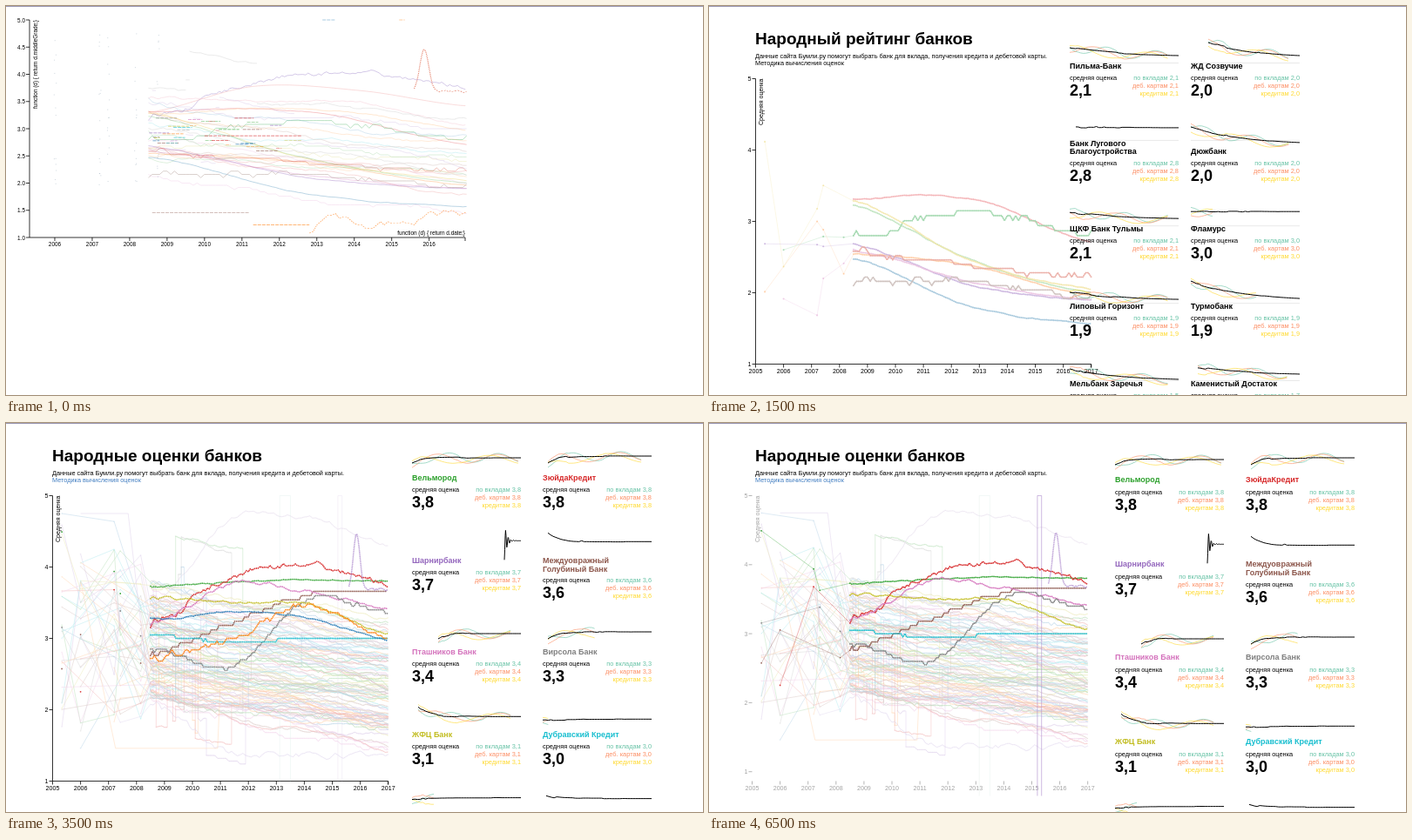
Write an HTML page that moves like this. It is 800 px wide and 447 px high and loops after 8000 ms.

```html
<!DOCTYPE html>
<html lang="ru">
<head>
<meta charset="utf-8">
<title>Народные оценки банков</title>
<style>
html, body { margin: 0; width: 100%; height: 100%; overflow: hidden; background: #fff; }
svg { display: block; width: 100vw; height: 100vh; font: 7.4px "Liberation Sans", Arial, sans-serif; }
path, line { fill: none; stroke-linejoin: round; }
.h1 { font-size: 19px; font-weight: bold; }
.name { font-size: 9px; font-weight: bold; }
.thin { stroke-width: .5; }
.dots { stroke-width: 1.8; stroke-linecap: round; stroke-dasharray: 0 2.1; }
.spark { stroke: #000; stroke-width: 1; }
.wave { stroke-width: .7; opacity: .85; }
</style>
</head>
<body>
<svg id="stage" viewBox="0 0 800 447" preserveAspectRatio="none"></svg>
<script>
const stage = document.getElementById('stage');
const HUES = ['#1f77b4', '#ff7f0e', '#2ca02c', '#d62728', '#9467bd',
  '#8c564b', '#d472bc', '#7f7f7f', '#c2bd22', '#17becf'];
const SOFT = ['#66c2a5', '#fc8d62', '#ffd92f'];
const LOUD = ['#8da0e8', '#fc8d62', '#c77fd0'];
const FIRST = 2008.5, LAST = 2017;

function random(seed) {
  return () => {
    seed = seed + 0x6D2B79F5 | 0;
    let t = Math.imul(seed ^ seed >>> 15, 1 | seed);
    t = t + Math.imul(t ^ t >>> 7, 61 | t) ^ t;
    return ((t ^ t >>> 14) >>> 0) / 4294967296;
  };
}
const rnd = random(41);
const clamp = (v, a, b) => Math.max(a, Math.min(b, v));
const all = (list, f) => list.map(f).join('');

// ---- data to path, in the base scale
const BASE = { x0: 53.5, kx: 32.1, y0: 83.5, ky: 82 };
const at = (t, v) => (BASE.x0 + (t - 2005) * BASE.kx).toFixed(1) + ' ' +
  (BASE.y0 + (5 - v) * BASE.ky).toFixed(1);
const route = pts => 'M' + pts.map(p => at(...p)).join('L');

// A smooth curve through evenly spaced values.
const ease = v => t => {
  const k = clamp((t - FIRST) / (LAST - FIRST), 0, 1) * (v.length - 1);
  const i = Math.min(Math.floor(k), v.length - 2), u = k - i;
  const a = v[i], b = v[i + 1];
  const p = i ? v[i - 1] : a, q = i + 2 < v.length ? v[i + 2] : b;
  return a + u * ((b - p) / 2 + u * (p - 2.5 * a + 2 * b - q / 2 + u * (1.5 * (a - b) + (q - p) / 2)));
};

function early(s) {
  const pts = [];
  if (rnd() < .45) return pts;
  for (const t of [2005.33, 2006, 2007.2, 2007.42, 2008.15]) {
    const spread = t < 2007.3 ? 2.4 : 1.3;
    if (rnd() < .5) pts.push([t, clamp(s + .2 + (rnd() - .5) * spread, 1.46, 4.75)]);
  }
  return pts;
}

function series(f, color, { noise = .03, step = 0, wild = false, gap = .1, start = FIRST } = {}) {
  const main = [];
  let n = 0, jump = 0;
  for (let t = start; t <= LAST; t += gap) {
    n = n * .8 + (rnd() - .5) * noise * (1 + 2 / (1 + 4 * (t - start)));
    if (wild && rnd() < .14) {
      if (main.length) main.push([t, main[main.length - 1][1]]);
      jump = t < 2011 ? (rnd() - .5) * 1.8 : 0;
    }
    let v = f(t) + n + jump;
    if (step) v = Math.round(v / step) * step;
    main.push([t, clamp(v, 1.05, 4.95)]);
  }
  return { color, main, pre: start > FIRST ? [] : early(f(FIRST)) };
}

const path = (color, d) => `<path stroke="${color}" d="${d}"/>`;
const body = s => path(s.color, route(s.main));
const thin = s => path(s.color, route([...s.pre, ...s.main]));
// Dots leave out the vertical jumps.
const dots = s => path(s.color, s.pre.map(p => `M${at(...p)}h.01`).join('') +
  s.main.map((p, i) => i && Math.abs(p[1] - s.main[i - 1][1]) < .1
    ? 'L' + at(...p) : `M${at(...p)}h.01`).join(''));

const crowd = Array.from({ length: 96 }, (_, i) => {
  const s = 2.2 + 1.6 * rnd() ** 1.5, e = 1.4 + (s - 2.2) * .9 + .6 * rnd() ** 1.4;
  const p = .6 + rnd() * .7, phase = rnd() * 6;
  const f = t => s + (e - s) * ((t - FIRST) / 8.5) ** p + .05 * Math.sin(t * 1.3 + phase);
  return series(f, HUES[i % 10], { noise: .035, wild: i % 7 == 0, step: i % 4 ? 0 : .04 });
});
crowd.push(series(ease([3.4, 4.68, 4.68, 4.3]), '#b59ac8', { noise: .05 }),
  series(ease([2.1, 1.4, 1.38, 1.4]), '#a98fd0', { noise: .07 }));

// Values at the start, the middle and the end.
const trends = [
  ['#e8646a', 3.32, 3.32, 2.72], ['#43b05c', 2.8, 3.15, 2.82, .07], ['#7fc97f', 3.23, 2.45, 2],
  ['#e8cf5a', 3.28, 2.45, 2.05], ['#ff9a4a', 2.55, 2.38, 1.95], ['#9467bd', 2.68, 2.1, 1.9],
  ['#4a8fb8', 2.48, 1.8, 1.57], ['#d889c4', 2.6, 2.15, 1.9], ['#d65a4a', 2.5, 2.4, 2.2, .06],
  ['#9a7f78', 2.1, 2.15, 1.95, .06]
].map(([c, a, b, d, step]) => series(ease([a, b, d]), c, { noise: step ? .06 : .012, step }));

const leaders = [
  [2, [3.72, 3.79, 3.83, 3.8], .012], [3, [3.2, 3.85, 4.03, 3.77], .06],
  [5, [2.8, 3.2, 3.62, 3.66], .02, .06], [6, [3.15, 3.75, 3.66, 3.42], .03],
  [7, [2.9, 2.6, 3.55, 3.35], .03, .05], [8, [3.58, 3.5, 3.48, 3.07], .02],
  [9, [3.05, 2.95, 3, 3], .01, .05], [0, [3.27, 3.37, 3.28, 2.97], .015],
  [1, [2.7, 3, 3.45, 3], .05, .04]
].map(([h, v, noise, step]) => series(ease(v), HUES[h], { noise, step, gap: .07 }));
const top7 = leaders.slice(0, 7), last2 = leaders.slice(7);
const peak = series(t => 3.68 + .78 * Math.exp(-(((t - 2015.87) / .17) ** 2)), 'currentColor',
  { start: 2015.6, gap: .04, noise: .02 });

const gate = (a, b, c) => path(c, route([[a, .65], [a, 5], [b, 5], [b, .65]]));
const odd = gate(2013.12, 2013.5, '#a6cfc4') + gate(2015.2, 2015.35, '#c3a6d8') +
  path(HUES[4], route([[2006, 4.75], [2007.7, 4.75], [2008.4, 2.4]])) +
  path(HUES[1], route([[2006, 3.8], [2007.25, 1.46], [2010.9, 1.46], [2011, 2.4]]));

const group = (id, s) => `<g id="${id}">${s}</g>`;
const defs = `<defs>
<clipPath id="box"><rect x="53" y="80" width="387" height="332"/></clipPath>
${group('crowdThin', all(crowd, thin) + odd)}${group('crowdDots', all(crowd, dots))}
${group('trendThin', all(trends, thin))}${group('trendDots', all(trends, dots))}
${group('topDots', all(top7, dots))}${group('topThin', all(top7, thin))}
${group('lastDots', all(last2, dots))}${group('lastThin', all(last2, thin))}
${group('peak', body(peak))}${group('gate', gate(2015.2, 2015.35, HUES[4]))}
</defs>`;

// ---- charts
const A = { x0: 13, kx: 42.97, y0: 16, ky: 62.5 };
const B = { x0: 71.5, kx: 30.6, y0: 83.5, ky: 82 };
const D = { ...BASE, ky: 79.3 };
const E = { ...D, x0: 49.5 };
function place(s, inner) {
  const a = s.kx / BASE.kx, d = s.ky / BASE.ky;
  return `<g transform="matrix(${a} 0 0 ${d} ${s.x0 - a * BASE.x0} ${s.y0 - d * BASE.y0})">${inner}</g>`;
}
const use = (id, cls, o, style = '') =>
  `<use href="#${id}" class="${cls}" opacity="${o}" style="${style}"/>`;
const clip = s => `<g clip-path="url(#box)">${s}</g>`;
const text = (x, y, s, more = '') => `<text x="${x}" y="${y}" ${more}>${s}</text>`;
const rule = (x1, y1, x2, y2, c) =>
  `<line x1="${x1}" y1="${y1}" x2="${x2}" y2="${y2}" stroke="${c}"/>`;

function axes(s, o) {
  const { left = 53.5, right = 438.5, base = 411.5, from = 2005, to = 2017, every = 1,
    color = '#000', bare, size = 7.1, label = 'Средняя оценка' } = o;
  let out = '';
  for (let v = 1; v <= 5; v += every) {
    const y = s.y0 + (5 - v) * s.ky;
    out += rule(left - 4, y, left, y, color) +
      text(left - 5, y + 2.5, v.toFixed(every < 1 ? 1 : 0), 'text-anchor="end"');
  }
  for (let t = from; t <= to; t++) {
    const x = s.x0 + (t - 2005) * s.kx;
    out += rule(x, base, x, base + 4, color) + text(x, base + 10.3, t, 'text-anchor="middle"');
  }
  if (!bare) out += rule(left, s.y0, left, base, color) + rule(left, base, right, base, color) +
    rule(right, base, right, base + 4, color);
  out += `<text text-anchor="end" transform="translate(${left + 8.5} ${s.y0}) rotate(-90)">${label}</text>`;
  if (every < 1) out += text(right, base - 3.5, 'function (d) { return d.date;}', 'text-anchor="end"');
  return `<g font-size="${size}" fill="${color}" stroke-width=".8">${out}</g>`;
}
const byGrade = { every: .5, label: 'function (d) { return d.middleGrade;}' };
const greyAxis = s => axes(s, { left: s.x0, color: '#a4a4a4', bare: true });

function sparse() {
  const bars = [[2013.15, .35, 5, 0], [2015.2, .15, 5, 1], [2008.6, 2.6, 1.46, 5],
    [2011.3, 1.5, 1.23, 1], [2010, 2.6, 2.87, 3]];
  for (let i = 0; i < 34; i++)
    bars.push([FIRST + 4 * rnd() ** 2, .1 + .5 * rnd(), 2.5 + .7 * rnd(), i % 10]);
  let specks = '';
  for (let i = 0; i < 70; i++) {
    const t = [2006, 2007.2, 2007.42, 2008.15, 2008.75][i % 5];
    specks += 'M' + at(t + (rnd() - .5) * .06, 1.95 + 2.8 * rnd() ** 1.5) + 'h.8';
  }
  const low = series(ease([1, 1, 1.25, 1.45]), '#ff9a4a', { noise: .1, step: .03, start: 2012.8 });
  const pale = ['#8a6cc0', '#f0a0a0', '#f2b8c8', '#ffbe80'];
  const high = pale.map((color, i) => ({ ...leaders[1 + i * 2], color }));
  high[1].main = high[0].main.map(([t]) => [t, ease([3.3, 3.78, 3.7, 3.42])(t)]);
  return place(A, `<g class="thin" stroke-width=".6" opacity=".7">${all(trends, body)}${all(high, body)}</g>
<g class="thin" opacity=".3">${all(crowd.slice(1, 18), dots)}</g>
<g stroke-width=".9" opacity=".75" stroke-dasharray="3 .8">${
  all(bars, ([t, w, v, h]) => path(HUES[h], route([[t, v], [t + w, v]])))}</g>
<g stroke-width=".9" opacity=".75" stroke-dasharray="1.6 1.2">${body(low)}${
  body({ ...peak, color: '#e06a50' })}</g>
<path d="${specks}" stroke="#9ab" stroke-width=".7" opacity=".6"/>`) +
    axes(A, { ...byGrade, left: 27, right: 527, base: 266, from: 2006, to: 2016, size: 6.4 });
}

function inkFan() {
  let d = '';
  for (let i = 0; i < 36; i++) {
    const h = i ? rnd() ** 1.8 : 1;
    const pts = [[2005.3, 1], [2006, 1 + .62 * h], [2007.2, 1 + .5 * h], [2007.42, 1],
      [2008.15, 1 + .33 * h], [2008.25, 1], [FIRST, 1 + .12 * h], [2008.55, 1]];
    for (let t = 2008.7; t < LAST; t += .09)
      pts.push([t, 1 + .01 * h + .22 * rnd() ** 4 * ((t - FIRST) / 8.5) ** 1.5]);
    d += route(pts);
  }
  return `<path d="${d}" stroke="#000" stroke-width=".4" opacity=".85"/>`;
}

const leadDots = o => use('topDots', 'dots', o) + use('lastDots', 'dots', o);
const inkChart = clip(place(B, use('crowdThin', 'thin', .28, 'filter:grayscale(1)') +
  use('crowdDots', 'dots', .33) + use('trendDots', 'dots', .4) + leadDots(.33) + inkFan())) +
  `<g stroke-width=".8">${rule(374.5, 100, 374.5, 428, '#777') + rule(421, 79, 421, 411, '#666') +
  rule(429.5, 79, 429.5, 411, '#666') + rule(436, 175, 436, 428, '#999')}</g>` + axes(B, byGrade);

const calm = use('trendThin', 'thin', .3) + use('trendDots', 'dots', .4, 'stroke-width:2.1');
const full = o => use('crowdThin', 'thin', .24 * o) + use('crowdDots', 'dots', .38 * o) +
  use('trendDots', 'dots', .42 * o) + leadDots(.4 * o) + use('peak', 'dots', .5 * o, 'color:#3aa060');
const faint = use('crowdThin', 'thin', .3) + use('crowdDots', 'dots', .07);
const lead = (lines, both = true) =>
  (lines ? use('topThin', 'thin', .7) + use('gate', 'thin', .8) : '') +
  (lines && both ? use('lastThin', 'thin', .7) : '') +
  use('topDots', 'dots', .9) + (both ? use('lastDots', 'dots', .9) : '') +
  use('peak', 'dots', .55, 'color:' + HUES[4]);

// ---- cards
const linePath = p => 'M' + p.map(q => q.map(n => n.toFixed(1)).join(' ')).join('L');
// Settles from y0 to y1 with an optional damped kick.
function settle(x0, y0, y1, { rate = 3, kick = 0, seed = 1 }) {
  const r = random(seed), pts = [];
  let n = 0;
  for (let i = 0; i <= 40; i++) {
    const u = i / 40;
    if (r() < .35) n = (r() - .5) * 3 * (1 - u) ** 2;
    pts.push([x0 + (125 - x0) * u, y0 + (y1 - y0) * (1 - Math.exp(-rate * u)) / (1 - Math.exp(-rate)) +
      n + kick * Math.exp(-7 * u) * Math.cos(u * 40)]);
  }
  return pts;
}
function spark(x, y, pts, end, hues, seed) {
  const waves = all(hues, c => {
    const k = hues.indexOf(c);
    const w = pts.filter(p => p[0] <= end)
      .map(([q, v]) => [q, v + 5 * Math.sin(q / (9 + k * 2) + k * 2.1 + seed) + k]);
    return w.length > 1 ? `<path class="wave" stroke="${c}" d="${linePath(w)}"/>` : '';
  });
  return `<g transform="translate(${x} ${y})">${waves}<path class="spark" d="${linePath(pts)}"/></g>`;
}

const inkCards = all([['ТЖЛ-Банк', '16,4', 30, 8, 29], ['Дольмирстан Банк', '19,3', 22, 18, 29],
  ['Дюжбанк кредитные карты', '19,5', 0, 15, 29], ['ЩЛФ Банк', '20,9', 0, 13, 29],
  ['ЖЛВ Тарюма Банк', '21,2', 30, 30, 30], ['Банк Зельмурт', '22,2', 0, 19, 27],
  ['Вельдомбанк', '22,5', 7, 22, 25], ['Мерклинтурбанк', '22,7', 30, 6, 26],
  ['Каменистый Достаток', '24,4', 7, 18, 24], ['Тумо Банк', '24,8', 38, 30, 30],
  ['Фюр Банк', '25,1', 0, 18, 28], ['Дальпашнябанк', '25,3', 0, 18, 28]
].map((b, i) => [...b, i]), ([name, val, x0, y0, y1, i]) => {
  const x = i % 2 ? 606 : 470, y = 7 + 86.2 * (i >> 1);
  return text(x, y + 3, name, 'class="name"') + rule(x, y + 34.5, x + 125, y + 34.5, '#e4e4e4') +
    spark(x, y, settle(x0, y0, y1, { seed: i, rate: 4 }), 115, LOUD, i) + text(x, y + 43.5, 'Рейтинг') +
    text(x, y + 58.3, val, 'font-size="14.5" font-weight="bold"');
});

const bank = rate => ([name, val, x0, y0, y1, end, kick], i) =>
  ({ name, val, end, color: HUES[(i + 2) % 10], pts: settle(x0, y0, y1, { rate, kick, seed: i + 30 }) });
const mild = [['Пильма-Банк', '2,1', 0, 2, 11, 113], ['ЖД Созвучие', '2,0', 20, -4, 11, 113],
  ['Банк Лугового|Благоустройства', '2,8', 7, 4, 5, 0], ['Дюжбанк', '2,0', 0, 4, 22, 113],
  ['ЩКФ Банк Тульмы', '2,1', 0, 4, 11, 113], ['Фламурс', '3,0', 0, 3, 3, 28],
  ['Липовый Горизонт', '1,9', 0, 7, 15, 113], ['Турмобанк', '1,9', 0, -6, 14, 75],
  ['Мельбанк Заречья', '1,5', 0, 6, 18, 113], ['Каменистый Достаток', '1,7', 8, 4, 12, 113]
].map(bank(2));
const best = [['Вельмород', '3,8', 0, 6, 0, 122], ['ЗюйдаКредит', '3,8', 6, 6, -2, 116],
  ['Шарнирбанк', '3,7', 106, 0, 0, 0, 22], ['Междуовражный|Голубиный Банк', '3,6', 6, -9, 1, 0],
  ['Пташников Банк', '3,4', 30, 8, 2, 115], ['Вирсола Банк', '3,3', 6, 8, 0, 60],
  ['ЖФЦ Банк', '3,1', 7, -9, 2, 115], ['Дубравский Кредит', '3,0', 0, 6, 5, 7],
  ['Фламурс', '3,0', 0, 2, 0, 28], ['Банк Ольмира', '3,0', 4, -3, 1, 0]
].map(bank(10));

function gradeCards(list, { x: [left, right], y: top, pitch, plain, gap = 13 }) {
  return all(list.map((b, i) => [b, i]), ([b, i]) => {
    const x = i % 2 ? right : left, row = i >> 1, lines = b.name.split('|');
    const y0 = top + pitch * row + (row > 1 ? 9.4 : 0);
    const y = y0 + (plain && row == 1 ? 9.4 * (2 - lines.length) : 0);
    const m = y + 9.4 * (lines.length - 1) + gap;
    return (plain ? rule(x, y0 - 3.5, x + 125, y0 - 3.5, '#e9e9e9') : '') +
      spark(x, y0 - 23, b.pts, b.end, SOFT, i) +
      lines.map((s, k) =>
        text(x, y + 3 + k * 9.4, s, `class="name" fill="${plain ? '#000' : b.color}"`)).join('') +
      text(x, m + 2.5, 'средняя оценка') +
      text(x, m + 20.5, b.val, 'font-size="18" font-weight="bold"') +
      ['по вкладам', 'деб. картам', 'кредитам'].map((s, k) =>
        text(x + 125, m + 2.5 + k * 9, `${s} ${b.val}`, `text-anchor="end" fill="${SOFT[k]}"`)).join('');
  });
}
const near = { x: [414, 553], y: 69, pitch: 88.9, plain: true };
const far = { ...near, x: [466, 617] };
const hued = { x: [466, 616], y: 63, pitch: 95.3 };
const loose = { ...hued, y: 65, pitch: 97.3, gap: 14 };

function heading(title, link) {
  return text(53, 43.5, title, 'class="h1"') +
    `<g font-size="7.33">${text(53, 59.5, 'Данные сайта Бумли.ру помогут выбрать банк для вклада, получения кредита и дебетовой карты.')}${
      text(53, 68.3, 'Методика вычисления оценок', `fill="${link}"`)}</g>`;
}

// ---- timeline: start, end, content
const first = sparse();
const layers = [
  [0, 500, first],
  [500, 1000, `<g transform="translate(-9 0)">${first}</g><g transform="translate(60 12)">${inkCards}</g>`],
  [1000, 1500, inkChart + inkCards],
  [1000, 3500, heading('Народный рейтинг банков', '#000')],
  [3500, 8000, heading('Народные оценки банков', '#3f7cc0')],
  [1500, 5500, axes(BASE, {})],
  [1500, 2000, clip(calm) + gradeCards(mild, near)],
  [2000, 2500, clip(full(.7)) + gradeCards(mild, far)],
  [2500, 3000, clip(full(1)) + gradeCards(best, far)],
  [3000, 6500, gradeCards(best, hued)],
  [3000, 3500, clip(full(.6) + lead(false))],
  [3500, 4000, clip(faint + lead(false))],
  [4000, 5000, clip(faint + lead(true))],
  [5000, 6000, place(D, faint + lead(true))],
  [5500, 6000, greyAxis(D)],
  [6000, 6500, place(E, faint + lead(true))],
  [6000, 8000, greyAxis(E)],
  [6500, 8000, place(E, faint + lead(true, false)) + gradeCards(best, loose)]
];
stage.innerHTML = defs + all(layers, l => `<g class="layer" display="none">${l[2]}</g>`) +
  '<rect width="800" height="1" fill="#9a98b4"/>';
const nodes = [...stage.querySelectorAll('.layer')];
const begin = performance.now();
let shown = -1;

function tick(now) {
  const t = Math.max(0, now - begin) % 8000, slot = Math.floor(t / 500);
  if (slot !== shown) {
    shown = slot;
    nodes.forEach((n, i) => {
      const [a, b] = layers[i];
      n.setAttribute('display', t >= a && t < b ? 'inline' : 'none');
    });
  }
  requestAnimationFrame(tick);
}
tick(begin);
</script>
</body>
</html>
```
